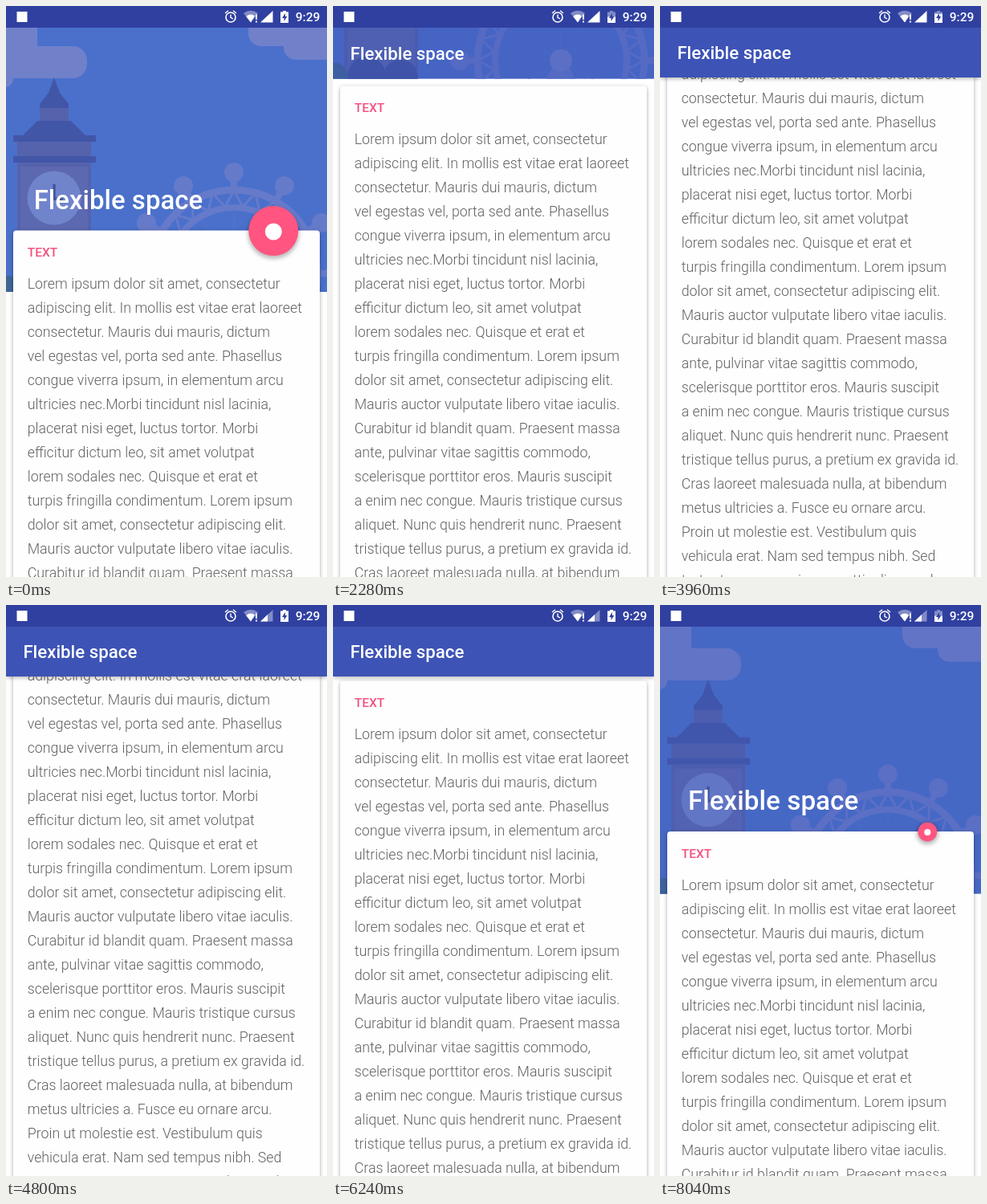
Animation, 400 px wide and 711 px high, one loop 8160 ms. Source, as an HTML page with a canvas:

```html
<!DOCTYPE html>
<html lang="en">
<head>
<meta charset="utf-8">
<title>Flexible space</title>
<style>
  html, body { margin: 0; height: 100%; overflow: hidden; background: #fff; }
  canvas { display: block; width: 400px; height: 711px; }
</style>
</head>
<body>
<canvas id="stage"></canvas>
<script>
const W = 400, H = 711, LOOP = 8160, STEP = 120;
const STATUS = 27, TOOLBAR = 89;
const PHONE = 1080 / W; // phone pixels per stage pixel
const canvas = document.getElementById('stage');
const ctx = canvas.getContext('2d');
const ratio = window.devicePixelRatio || 1;
canvas.width = W * ratio;
canvas.height = H * ratio;

const LINES = [
  'Lorem ipsum dolor sit amet, consectetur',
  'adipiscing elit. In mollis est vitae erat laoreet',
  'consectetur. Mauris dui mauris, dictum',
  'vel egestas vel, porta sed ante. Phasellus',
  'congue viverra ipsum, in elementum arcu',
  'ultricies nec.Morbi tincidunt nisl lacinia,',
  'placerat nisi eget, luctus tortor. Morbi',
  'efficitur dictum leo, sit amet volutpat',
  'lorem sodales nec. Quisque et erat et',
  'turpis fringilla condimentum. Lorem ipsum',
  'dolor sit amet, consectetur adipiscing elit.',
  'Mauris auctor vulputate libero vitae iaculis.',
  'Curabitur id blandit quam. Praesent massa',
  'ante, pulvinar vitae sagittis commodo,',
  'scelerisque porttitor eros. Mauris suscipit',
  'a enim nec congue. Mauris tristique cursus',
  'aliquet. Nunc quis hendrerit nunc. Praesent',
  'tristique tellus purus, a pretium ex gravida id.',
  'Cras laoreet malesuada nulla, at bibendum',
  'metus ultricies a. Fusce eu ornare arcu.',
  'Proin ut molestie est. Vestibulum quis',
  'vehicula erat. Nam sed tempus nibh. Sed',
  'tortor tempus maximus mattis diam sed',
  'varius.'
];

// Time in ms, top edge of the card
const SCROLL = [[0, 280], [1200, 188], [2280, 100], [3960, -11], [4500, -22],
                [5520, 41], [6960, 156.7], [8040, 282.6], [8160, 284]];
// Time in ms, share of the battery that is lit
const CHARGE = [[0, 1], [720, .5], [3120, .75], [4560, 1], [7440, .5]];

const clamp = v => Math.min(1, Math.max(0, v));
const progress = (t, start, length) => clamp((t - start) / length);
const easeInOut = p => (1 - Math.cos(Math.PI * p)) / 2;

// Smooth curve through all scroll keys
function cardTop(t) {
  let i = 0;
  while (i < SCROLL.length - 2 && t >= SCROLL[i + 1][0]) i++;
  const slope = k => {
    const a = SCROLL[Math.max(0, k - 1)], b = SCROLL[Math.min(SCROLL.length - 1, k + 1)];
    return (b[1] - a[1]) / (b[0] - a[0]);
  };
  const [t0, y0] = SCROLL[i], [t1, y1] = SCROLL[i + 1];
  const d = t1 - t0, u = (t - t0) / d, v = 1 - u;
  return y0 * v * v * (1 + 2 * u) + y1 * u * u * (3 - 2 * u)
       + d * u * v * (slope(i) * v - slope(i + 1) * u);
}

function rect(x, y, w, h, color, r = 0) {
  ctx.fillStyle = color;
  ctx.beginPath();
  ctx.roundRect(x, y, w, h, r);
  ctx.fill();
}
function disc(x, y, r, color) {
  ctx.fillStyle = color;
  ctx.beginPath();
  ctx.arc(x, y, r, 0, Math.PI * 2);
  ctx.fill();
}
function ring(x, y, r, width, color) {
  ctx.strokeStyle = color;
  ctx.lineWidth = width;
  ctx.beginPath();
  ctx.arc(x, y, r, 0, Math.PI * 2);
  ctx.stroke();
}
function shape(path, color) {
  ctx.fillStyle = color;
  ctx.fill(new Path2D(path));
}
function line(path, width, color) {
  ctx.strokeStyle = color;
  ctx.lineWidth = width;
  ctx.stroke(new Path2D(path));
}
// Text is laid out in phone pixels, size included, then scaled down
function label(text, x, y, size, weight, color) {
  ctx.save();
  ctx.translate(x, y);
  ctx.scale(1 / PHONE, 1 / PHONE);
  ctx.font = `${weight} ${size}px Roboto, sans-serif`;
  ctx.fillStyle = color;
  ctx.fillText(text, 0, 0);
  ctx.restore();
}

function drawClouds() {
  const color = '#7081ca';
  rect(-30, 0, 69, 75, color, 18);
  rect(-30, 50, 131, 40, color, 18);
  rect(-30, 62, 39, 39, color, 10);
  rect(302, 5, 120, 45, color, 16);
  rect(346, 20, 80, 47, color, 15);
}

function drawTower() {
  const body = '#5562ac', dark = '#4256a8';
  shape('M60 89 L67 108 L78 122 V128 H42 V122 L53 108 Z', dark);
  rect(42, 127, 36, 18, body);
  shape('M39 143 H81 L100 162 H20 Z', dark);
  rect(9, 161, 103, 8, dark);
  rect(14, 169, 92, 18, body);
  rect(9, 187, 103, 8, dark);
  rect(14, 195, 92, 161, body);
  rect(18, 200, 84, 156, '#5c68b0');
  disc(60, 239, 33.5, '#7084cc');
  line('M60 222 V240 H71', 3.5, '#41559f');
}

function drawWheel() {
  const x = 284, y = 333, color = '#667aca';
  const at = (a, r) => [x + r * Math.sin(a), y - r * Math.cos(a)];
  ring(x, y, 104, 9, color);
  ring(x, y, 82, 8, color);
  ctx.lineWidth = 3;
  ctx.beginPath();
  for (let k = 0; k <= 48; k++) ctx.lineTo(...at(k * Math.PI / 24, k % 2 ? 84 : 103));
  ctx.stroke();
  ctx.strokeStyle = '#5673cb';
  ctx.lineWidth = 1.2;
  ctx.beginPath();
  for (let k = 0; k < 12; k++) {
    ctx.moveTo(x, y);
    ctx.lineTo(...at(k * Math.PI / 6, 80));
  }
  ctx.stroke();
  ctx.strokeStyle = color;
  for (let k = 0; k < 12; k++) {
    ctx.lineWidth = 8;
    ctx.beginPath();
    ctx.moveTo(...at(k * Math.PI / 6, 104));
    ctx.lineTo(...at(k * Math.PI / 6, 122));
    ctx.stroke();
    disc(...at(k * Math.PI / 6, 126), 12, color);
  }
  shape('M278 333 H290 L302 356 H266 Z', color);
  disc(x, y, 14, '#6f82cd');
}

function drawHeader(bottom, scrim) {
  ctx.save();
  ctx.beginPath();
  ctx.rect(0, 0, W, bottom);
  ctx.clip();
  rect(0, 0, W, bottom, '#4a70cb');
  ctx.translate(0, bottom - 356);
  drawClouds();
  drawWheel();
  drawTower();
  disc(2, 352, 16, '#3f6694');
  disc(42, 352, 24, '#41559f');
  disc(84, 354, 22, '#41559f');
  ctx.translate(0, 356 - bottom);
  ctx.globalAlpha = scrim;
  rect(0, 0, W, bottom, '#3d53b6');
  ctx.restore();
}

function drawCard(top) {
  ctx.save();
  ctx.beginPath();
  ctx.rect(0, TOOLBAR, W, H);
  ctx.clip();
  ctx.shadowColor = 'rgba(0,0,0,.35)';
  ctx.shadowBlur = 5 * ratio;
  ctx.shadowOffsetY = 1.5 * ratio;
  rect(9, top - .5, 382, 1000, '#fefefe', 4);
  ctx.shadowColor = 'transparent';
  label('TEXT', 26.7, top + 32, 42, 500, '#f4517f');
  LINES.forEach((text, i) => label(text, 26.7, top + 72 + i * 30, 48, 300, '#616161'));
  ctx.restore();
}

function drawButton(y, scale) {
  if (scale <= 0) return;
  ctx.save();
  ctx.translate(333.3, y);
  ctx.filter = `blur(${2.5 * ratio}px)`;
  disc(0, 2 * scale + 1, 29.5 * scale + 2.5, 'rgba(0,0,0,.26)');
  ctx.filter = 'none';
  ctx.scale(scale, scale);
  disc(0, 0, 31, '#ff5580');
  disc(0, 1, 10.5, '#fff');
  ctx.restore();
}

function drawStatusBar(t) {
  const white = '#fff', pale = 'rgba(255,255,255,.4)';
  rect(0, 0, W, STATUS, '#3040a0');
  rect(13.5, 7, 13, 13, white);

  ring(280, 14, 6, 1.6, white);
  line('M280 10.5 V14.3 L283 16 M273 9 L277 5.8 M287 9 L283 5.8', 1.4, white);

  shape('M296 9 Q305 2.5 314 9 L305 20.5 Z', pale);
  shape('M299.2 13 Q305 8.5 310 12.5 L305 20.5 Z', white);
  rect(311, 10.5, 2, 6.5, white);
  rect(311, 18.5, 2, 2, white);

  const fullSignal = t < 4800;
  shape('M317 20.5 H332.5 V6 Z', fullSignal ? white : pale);
  if (!fullSignal) shape('M317 20.5 H326 V12 Z', white);

  const level = CHARGE.filter(key => key[0] <= t).pop()[1];
  const battery = 'M342 7.5 H345 V6 H349 V7.5 H352 V21 H342 Z';
  shape(battery, pale);
  ctx.save();
  ctx.beginPath();
  ctx.rect(340, 21 - 15 * level, 14, 15 * level);
  ctx.clip();
  shape(battery, white);
  ctx.restore();
  shape('M348 9 L344 15 H346.5 V19 L350.3 13 H348 Z', '#3040a0');

  label('9:29', 360.7, 19.3, 42, 500, white);
}

function draw(t) {
  const top = cardTop(t);
  const bottom = Math.max(TOOLBAR, 356 + 1.473 * (top - 280));
  const open = (bottom - TOOLBAR) / (356 - TOOLBAR);
  const scrim = t < 4500 ? progress(t, 1560, 1200) ** 1.8 : 1 - progress(t, 7020, 1400);
  const button = t < 4500 ? 1 - easeInOut(progress(t, 640, 600))
                          : easeInOut(progress(t, 7785, 600));

  ctx.setTransform(ratio, 0, 0, ratio, 0, 0);
  rect(0, 0, W, H, '#fff');
  if (bottom === TOOLBAR) {
    drawCard(top);
    ctx.shadowColor = 'rgba(0,0,0,.3)';
    ctx.shadowBlur = 5 * ratio;
    ctx.shadowOffsetY = 1.5 * ratio;
    rect(0, 0, W, TOOLBAR, '#3d53b6');
    ctx.shadowColor = 'transparent';
    drawHeader(bottom, scrim);
  } else {
    drawHeader(bottom, scrim);
    drawCard(top);
  }
  label('Flexible space', 21.4 + 13.3 * open, 66 + 186.5 * open,
        60 + 29 * open * open, 500, '#fff');
  drawButton(top, button);
  drawStatusBar(t);
}

function tick(now) {
  const step = Math.floor(now % LOOP / STEP) * STEP;
  draw(step < 2 * STEP ? 0 : step);
  requestAnimationFrame(tick);
}
requestAnimationFrame(tick);
</script>
</body>
</html>
```
